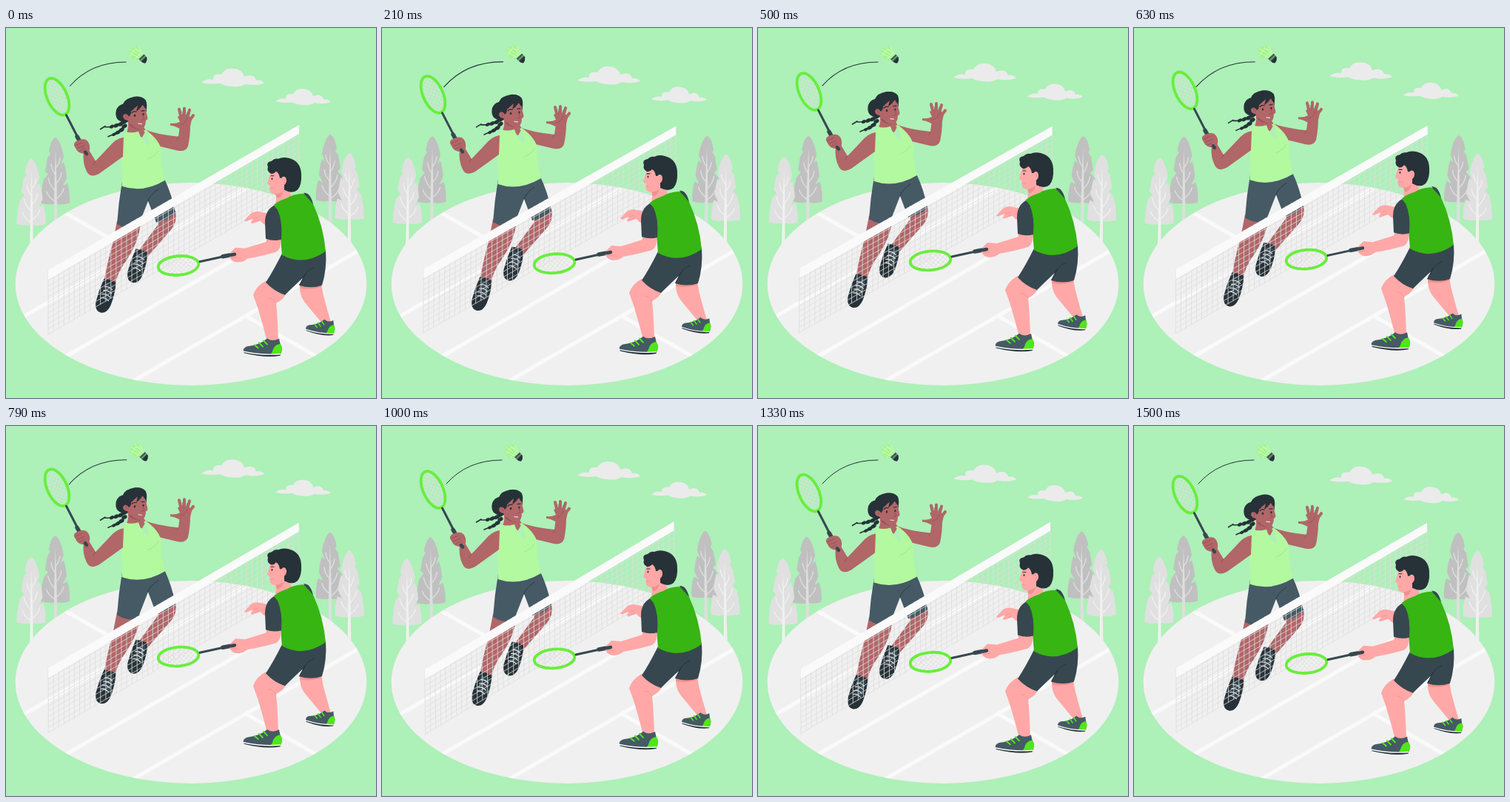
These frames come from a looping animation (500 px wide and 500 px high, 1.54 s). An HTML page with a canvas:

```html
<!DOCTYPE html>
<html lang="en">
<head>
<meta charset="utf-8">
<title>Badminton</title>
<style>
  html, body { margin: 0; width: 100%; height: 100%; overflow: hidden; background: #adf0b8; }
  canvas { display: block; width: 100vw; height: 100vh; }
</style>
</head>
<body>
<canvas id="stage"></canvas>
<script>
const SIZE = 500, LOOP = 1540, CYCLE = 1500, TICK = CYCLE / 36;
const canvas = document.getElementById('stage');
const ctx = canvas.getContext('2d');
const density = Math.max(1, window.devicePixelRatio || 1);
canvas.width = canvas.height = SIZE * density;

const INK = '#263238', SLATE = '#37474f', STEEL = '#455a64';
const BROWN = '#b16668', BROWN_DARK = '#8f4f53', PINK = '#ffa8a7', PINK_DARK = '#f28f8f';
const LIME = '#b3f9a0', GREEN = '#37b512', FRAME = '#68ee3c', PALE = '#fafafa';

const paths = new Map();
function path(d) {
  if (!paths.has(d)) paths.set(d, new Path2D(d));
  return paths.get(d);
}
function fill(color, d) {
  ctx.fillStyle = color;
  ctx.fill(path(d));
}
function stroke(color, width, d) {
  ctx.strokeStyle = color;
  ctx.lineWidth = width;
  ctx.stroke(path(d));
}
function oval(color, x, y, rx, ry = rx, turn = 0) {
  ctx.fillStyle = color;
  ctx.beginPath();
  ctx.ellipse(x, y, rx, ry, turn, 0, 7);
  ctx.fill();
}
function group(draw, setup) {
  ctx.save();
  setup();
  draw();
  ctx.restore();
}
const lift = (dy, draw) => group(draw, () => ctx.translate(0, dy));
function around(x, y, change, draw) {
  group(draw, () => {
    ctx.translate(x, y);
    change();
    ctx.translate(-x, -y);
  });
}

function cloud() {
  fill('#ebebeb', 'M264 73Q271 67 280 69Q279 60 291 62Q296 53 307 54Q320 55 322 65Q335 60 338 70Q346 69 349 74Q336 78 324 75Q316 80 304 78Q293 77 290 74Q276 76 264 73Z');
}
function clouds() {
  cloud();
  group(cloud, () => {
    ctx.translate(364, 81.5);
    ctx.scale(0.88, 0.9);
    ctx.translate(-264, -54);
  });
}

function tree(x, y, flip, leaf, wood) {
  group(() => {
    fill(leaf, 'M0 0Q-6 2 -9 18L-7 21L-11 27Q-13 39 -14 44L-10 48L-16 55Q-20 70 -20 86Q-9 89 0 87Q10 89 19 86Q20 72 16 60L10 63L15 53Q14 40 11 32L7 36L11 25Q7 4 0 0Z');
    fill(wood, 'M0 16L1.5 60L2.4 125H-2.4L-1.5 60Z');
    stroke(wood, 1.4, 'M0 40Q5 35 6 27M0 49Q-5 43 -6 35M0 61Q7 55 8 46M0 70Q-8 63 -10 53M0 81Q9 75 11 67M0 84Q-9 79 -12 71');
  }, () => {
    ctx.translate(x, y);
    ctx.scale(flip, 1.03);
  });
}
function trees() {
  tree(67, 148, 1, '#c0c0c0', '#dedede');
  tree(34.5, 176.5, 1, '#e0e0e0', '#f0f0f0');
  tree(438, 144, -1, '#c0c0c0', '#dedede');
  tree(464, 168.5, -1, '#e0e0e0', '#f0f0f0');
}

function court() {
  oval('#f0f0f0', 250, 346, 237.3, 137);
  group(() => {
    stroke(PALE, 5, 'M15 395L335 210M72 449L432 241M165 481L485 296M75 247L173 303M324 389L430 450');
  }, () => {
    ctx.beginPath();
    ctx.ellipse(250, 346, 237, 137, 0, 0, 7);
    ctx.clip();
  });
}

function net() {
  const left = 57, right = 396, top = 327, rise = 196, drop = 87, cols = 48, rows = 12;
  ctx.strokeStyle = '#dedede';
  ctx.lineWidth = 0.8;
  ctx.beginPath();
  for (let i = 0; i <= cols; i++) {
    const x = left + (right - left) * i / cols, y = top - rise * i / cols;
    ctx.moveTo(x, y);
    ctx.lineTo(x, y + drop);
  }
  for (let i = 2; i <= rows; i++) {
    const y = top + drop * i / rows;
    ctx.moveTo(left, y);
    ctx.lineTo(right, y - rise);
  }
  ctx.stroke();
  fill(PALE, 'M57 327L396 131V143L57 340Z');
}

function racketHead(x, y, a, b, turn) {
  group(() => {
    ctx.beginPath();
    ctx.ellipse(0, 0, a, b, 0, 0, 7);
    ctx.save();
    ctx.clip();
    ctx.beginPath();
    for (let i = -45; i <= 45; i += 6.5) {
      ctx.moveTo(i - 14, -14);
      ctx.lineTo(i + 14, 14);
      ctx.moveTo(i + 14, -14);
      ctx.lineTo(i - 14, 14);
    }
    ctx.strokeStyle = '#dcdfdc';
    ctx.lineWidth = 0.8;
    ctx.stroke();
    ctx.restore();
    ctx.beginPath();
    ctx.ellipse(0, 0, a, b, 0, 0, 7);
    ctx.strokeStyle = FRAME;
    ctx.lineWidth = 3.8;
    ctx.stroke();
  }, () => {
    ctx.translate(x, y);
    ctx.rotate(turn);
  });
}

function shuttle() {
  stroke(INK, 1, 'M87 78Q115 46 162 46');
  fill('#a4f58c', 'M166 36L167 29L172 26L178 25L182 29L186 36L180 43L171 42Z');
  stroke('#d3fbc6', 0.9, 'M167 34L181 41M168 29L183 39M173 26L184 37M179 26L185 36M168 38L174 29L181 31M174 42L183 33');
  fill(STEEL, 'M179 42L186 35.5L190 40Q190 46 187 47.5Q183 47 179 42Z');
  fill(INK, 'M183 45.5L189 39Q191 44 188 47.5Q185 48 183 45.5Z');
  stroke('#6fd95a', 1, 'M181.5 44L188 38');
}

function womanShoe(x, y) {
  group(() => {
    fill(INK, 'M12 0Q21 1 28 5Q27 21 21 36Q16 47 8 46Q-1 44 1 31Q5 15 12 0Z');
    fill(SLATE, 'M13 5L25 8Q24 22 19 30L9 27Z');
    stroke('#f0f0f0', 1.1, 'M13 11Q18 10 23 15M11 16Q17 15 22 20M9 21Q15 20 20 25M8 26Q13 25 18 30');
  }, () => ctx.translate(x, y));
}

function braid(points) {
  points.forEach(([x, y, size]) => oval(INK, x, y, size * 1.5, size, -0.5));
}

function womanHead() {
  braid([[160, 126, 2.6], [155, 129, 2.6], [149, 131, 2.5], [143, 132.5, 2.2]]);
  braid([[160, 132, 2.6], [156, 137, 2.6], [151, 140.5, 2.4], [146, 143, 2]]);
  stroke(INK, 1.6, 'M142 133L134 133M134 132L127.5 136M145 143L138 146');
  fill(INK, 'M166 126Q157 128 151 123Q147 118 149 110Q152 103 158 102Q161 94 174 92Q187 91 190 101V112L180 116Z');
  fill(BROWN, 'M163 120Q168 132 162 142L184 147L189 138L185 131Z');
  fill(BROWN_DARK, 'M166 129Q172 137 183 136L185 133Z');
  fill(BROWN, 'M165 111Q169 105 178 103L189 104Q189 113 191.5 121Q191 124 189 124Q189 134 182 136.5Q170 135 166 124Q158 124 158 118Q160 113 165 117Z');
  fill(INK, 'M158 112Q156 99 168 94Q182 89 189 97Q191 103 190 109Q186 107 185 102Q182 108 176 112L178 104Q172 109 169 112Q169 117 166 119Q163 112 158 116Z');
  oval(INK, 174, 117.5, 1.2, 1.7);
  oval(INK, 185.5, 116, 1.1, 1.6);
  stroke(INK, 1.2, 'M170 114Q173 111 176 112.5M183 111.5L187 111');
  stroke(BROWN_DARK, 0.8, 'M184 116L187 123L183 124M161 117Q164 117 163 121');
  stroke('#f3dada', 1.2, 'M179 128.5L183.5 129');
}

function woman() {
  fill(BROWN, 'M186 136Q203 143 233 146L235 131L249 129Q249 145 246 159Q243 167 232 165L203 158Z');
  fill(BROWN, 'M222 128Q229 129 235 126L232 119L238 116L247 117L251 123L249 132L234 135Q227 131 222 131Z');
  stroke(BROWN, 4, 'M237 122L234 109M241 120L241 108M245 121L248 110M248 124L253 117.5');
  stroke(BROWN_DARK, 0.7, 'M233 146L231 150M236 130Q243 128 245 121M239 117L238 112M244 117L245 113');

  fill(BROWN, 'M203 254L229 246Q232 262 223 272L188 312L175 306L206 264Z');
  fill(BROWN, 'M150 260L182 264Q179 289 163 313Q150 330 147 348L132 344Q137 315 144 291Z');
  womanShoe(163.5, 297.5);
  womanShoe(120.5, 338);
  fill(STEEL, 'M157 206Q152 235 150 264Q164 273 178 269L192 233L203 262Q217 260 229 249Q224 224 214 203Z');
  stroke(INK, 0.8, 'M192 233Q193 226 206 217');

  womanHead();
  fill(LIME, 'M160 143Q154 151 155 165Q158 192 156.5 213Q185 223 215 205Q209 182 210 165Q208 151 189 137L186 138Q196 151 192 158Q182 150 179 139Q168 142 162 139Z');
  stroke('#8bdd78', 0.6, 'M206 165Q200 174 192 176');

  racketHead(69, 92, 26.5, 13.4, 1.15);
  stroke(SLATE, 3, 'M81.5 117L98 149');
  stroke(SLATE, 5.5, 'M96 146L109 169');
  fill(BROWN, 'M159 147Q149 148 139 160L121 179L112 164L105 166Q103 181 109 193Q114 203 126 196L158 173Z');
  fill(BROWN, 'M92 158Q91 153 98 151Q108 147 112 155Q115 162 111 168Q102 171 96 165Z');
  stroke(SLATE, 4.5, 'M107 167L109 169.5');
  stroke(BROWN_DARK, 0.8, 'M94 158L103 154M96 162L106 158M99 166L106 162M121 179L118 184');
}

function manShoe(x, y, width, height, turn) {
  group(() => {
    fill(INK, 'M0 18Q20 22 51 17L50 23Q30 27 1 20Z');
    fill(STEEL, 'M32 0Q39 5 48 0Q49 7 52 12Q52 19 50 21Q28 23 0 18Q-1 13 5 11Q22 9 32 0Z');
    fill('#50e61a', 'M39 18Q41 8 50 7L52 13Q52 20 50 21L37 21Z');
    stroke('#fff', 1.4, 'M0 18Q24 23 50 21');
    stroke('#50e61a', 2, 'M15 9L20 13M21 6L26 11M27 3L32 8');
  }, () => {
    ctx.translate(x, y);
    ctx.rotate(turn);
    ctx.scale(width, height);
  });
}

function manHead() {
  fill(PINK, 'M362 217Q367 226 364 236Q373 240 386 228L382 211Z');
  fill(PINK_DARK, 'M364 223Q371 223 376 214Q374 229 366 229Z');
  fill(PINK, 'M359 190Q356 200 353 209Q354 212 357 212Q355 222 361 223.5Q370 225 377 217L382 194Z');
  fill(INK, 'M358 196Q352 193 354 187Q351 180 359 179Q363 175 368 176Q374 173 382 175Q398 179 399 196Q400 211 394 218Q387 224 376 218L376 211Q371 207 373 202L370 202Q369 195 365 193Q362 197 358 196Z');
  oval(PINK, 375, 206, 4, 6, 0.15);
  stroke(PINK_DARK, 0.8, 'M374 203Q378 202 376 209M357 216L361 216');
  oval(INK, 359.5, 203, 0.9, 1.5);
  stroke(INK, 1.1, 'M358 199L362 199');
}

function man() {
  fill(PINK, 'M355 250L340 247Q332 247 328 253L322 259Q323 262 328 259L334 257L331 262Q332 265 336 262L344 260Q348 266 355 266Z');
  stroke(PINK_DARK, 0.7, 'M334 257L341 255M336 262L342 258');

  fill(PINK, 'M397 345L426 345Q428 359 432 372L439 397Q433 401 427 398Q412 380 403 369Q396 359 397 345Z');
  fill(PINK_DARK, 'M397 347Q411 351 426 346L426 349Q411 354 398 351Z');
  manShoe(406.5, 391, 0.75, 0.87, 0.09);
  fill(PINK, 'M351 341Q338 348 334 360Q341 378 346 397L353 423Q361 426 368 422Q367 389 365 371Q377 365 379 356Z');
  stroke(PINK_DARK, 0.8, 'M365 371Q361 365 355 364');
  manShoe(321, 418.5, 1, 1, 0.01);

  fill(SLATE, 'M373 304Q402 319 432 299Q434 325 427 347Q412 352 396 347L401 337Q387 350 377 360Q362 355 351 343Q361 328 373 304Z');
  stroke(INK, 0.9, 'M401 337Q405 328 416 323M397 346L405 332');
  fill(SLATE, 'M398 224Q409 221 415 238L406 244Z');
  manHead();
  fill(GREEN, 'M362 238Q370 232 380 229Q387 224 401 223Q410 228 415 237Q429 267 432 301Q402 322 373 306Q371 270 362 238Z');
  fill(SLATE, 'M402 222Q411 221 415 237L407 228Z');

  racketHead(233, 320.3, 27.4, 12.8, -0.09);
  stroke(SLATE, 3, 'M262 315L294 308');
  stroke(SLATE, 5.5, 'M293 308L309 305');
  fill(PINK, 'M351 280L371 283Q373 297 365 302Q348 307 326 311Q318 318 308 315Q300 311 303 303L310 296L323 297L352 288Z');
  stroke(SLATE, 4.5, 'M304 306L309 305');
  stroke(PINK_DARK, 0.8, 'M305 310L313 309M352 288L355 285');
  fill(SLATE, 'M362 239Q350 246 350 262L351 284Q362 288 372 285Q374 260 367 245Z');
}

// Linear interpolation through [position, value] pairs.
function follow(keys, p) {
  const i = keys.findIndex(key => key[0] > p);
  const [p0, v0] = keys[i - 1], [p1, v1] = keys[i];
  return v0 + (v1 - v0) * (p - p0) / (p1 - p0);
}
const FLOAT = [[0, 0.7], [0.5, -9.3], [1.01, 0.9]];
const SWAY = [[0, 0], [0.25, 1], [0.75, -1], [1.01, 0.04]];
const BEAT = [[0, 1.01], [0.14, 1.065], [0.28, 1], [0.33, 1], [0.43, 1.065], [0.66, 1], [1.01, 1]];

function draw(now) {
  const time = Math.floor((now % LOOP + 3) / TICK) * TICK;
  const p = Math.min(time / CYCLE, 1);
  const dy = follow(FLOAT, p), angle = follow(SWAY, p) * Math.PI / 180, beat = follow(BEAT, p);
  const sway = part => around(249, 272, () => ctx.rotate(angle), part);

  ctx.setTransform(density, 0, 0, density, 0, 0);
  ctx.lineCap = ctx.lineJoin = 'round';
  ctx.fillStyle = '#adf0b8';
  ctx.fillRect(0, 0, SIZE, SIZE);
  lift(dy, clouds);
  sway(trees);
  court();
  lift(dy, woman);
  sway(net);
  around(139, 52, () => ctx.scale(beat, beat), shuttle);
  lift(dy, man);
}

const start = performance.now();
function loop() {
  draw(performance.now() - start);
  requestAnimationFrame(loop);
}
loop();
</script>
</body>
</html>
```
